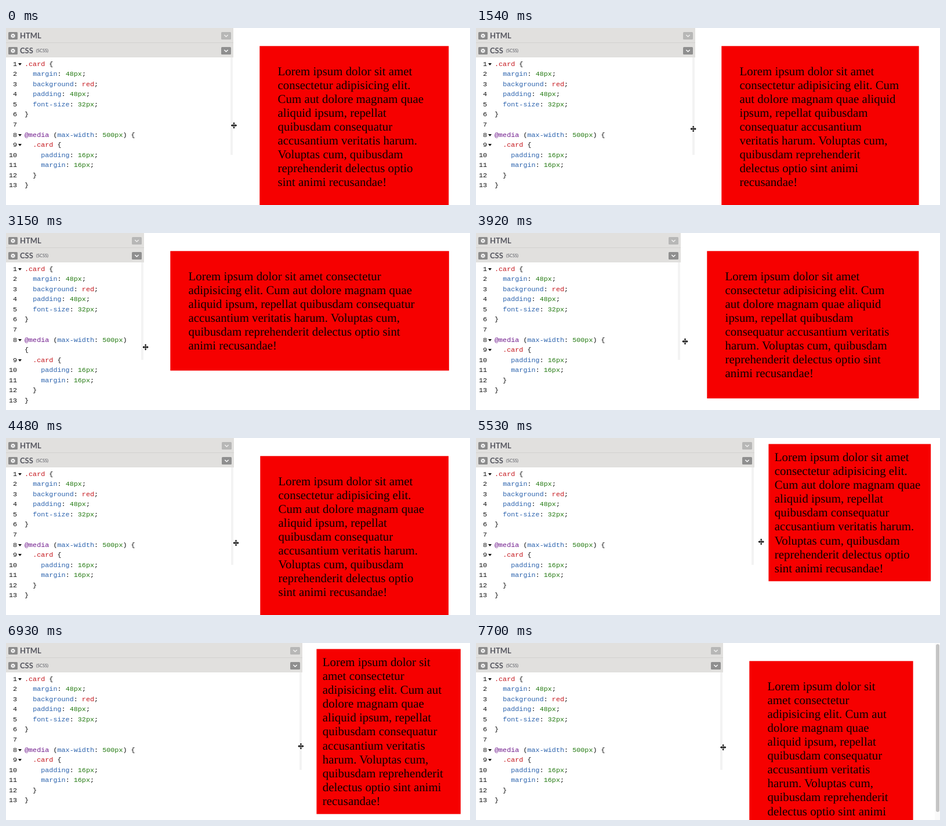
Animation of 800x307 px, one loop 7770 ms. Source, as an HTML page:

```html
<!DOCTYPE html>
<html lang="en">
<head>
<meta charset="utf-8">
<title>Resizing a card</title>
<style>
  html, body { margin: 0; width: 100%; height: 100%; overflow: hidden; background: #fff; }
  #stage { position: relative; width: 800px; height: 307px; overflow: hidden; background: #fff; }

  #editor { position: absolute; left: 0; top: 0; height: 307px; }
  .bar {
    position: absolute; left: 0; right: 0; height: 25px;
    background: #e1e0de; color: #55565f;
    font: bold 13px/25px Lato, sans-serif;
  }
  .bar b { position: absolute; left: 24px; top: 1px; }
  .bar small { position: absolute; left: 52px; top: 1px; font-size: 7.4px; font-weight: normal; }
  .bar svg { position: absolute; top: 6.5px; }
  .gear { left: 4px; }
  .fold { right: 4px; }
  .html { top: 0; border-bottom: 1px solid #d3d2d0; }
  .css { top: 26px; }
  .html .fold { opacity: .5; }

  #code { position: absolute; left: 0; right: 18px; top: 54.5px; font: 11.78px/17.58px "Liberation Mono", monospace; color: #111; }
  .line { position: relative; padding-left: 32px; min-height: 17.58px; white-space: pre-wrap; }
  .line i { position: absolute; left: 0; width: 19px; text-align: right; font-style: normal; }
  .open::before {
    content: ""; position: absolute; left: 20.5px; top: 6.3px;
    border: 3.6px solid transparent; border-top: 4.4px solid #111; border-bottom: 0;
  }
  .sel, .val { color: #c4161c; }
  .at { color: #6f1a8c; }
  .prop { color: #2a62ad; }
  .num { color: #247a12; }
  #thumb { position: absolute; right: 1px; top: 51px; width: 4px; height: 169px; background: #f3f3f3; }

  #page { position: absolute; top: 0; transform: scale(.652); transform-origin: 0 0; }
  #card {
    margin: 48px; padding: 48px; background: #f60000; color: #0c0000;
    font: 32px/37px "Liberation Serif", "Times New Roman", serif;
    text-rendering: geometricPrecision;
  }
  .narrow #card { margin: 16px; padding: 16px; }
  #scroll { position: absolute; left: 791px; top: 0; width: 9px; height: 307px; background: #fafafa; }
  #scroll::before {
    content: ""; position: absolute; left: 1.5px; top: 2px; width: 6px; height: 291px;
    border-radius: 3px; background: #c4c4c4;
  }
  #cursor { position: absolute; left: -8px; top: -8px; }
</style>
</head>
<body>
<div id="stage">
  <div id="page"><div id="card">Lorem ipsum dolor sit amet consectetur adipisicing elit. Cum aut dolore magnam quae aliquid ipsum, repellat quibusdam consequatur accusantium veritatis harum. Voluptas cum, quibusdam reprehenderit delectus optio sint animi recusandae!</div></div>
  <div id="scroll"></div>
  <div id="editor">
    <div class="bar html"><b>HTML</b></div>
    <div class="bar css"><b>CSS</b><small>(SCSS)</small></div>
    <div id="code"></div>
    <div id="thumb"></div>
  </div>
  <svg id="cursor" width="16" height="16">
    <path d="M8 2.5V13.5M3 8H13M5.5 5.5L3 8L5.5 10.5M10.5 5.5L13 8L10.5 10.5M6.5 4L8 2.7L9.5 4M6.5 12L8 13.3L9.5 12" fill="none" stroke="#fff" stroke-width="3"/>
    <path d="M8 3V13M3.5 8H12.5" stroke="#111" stroke-width="1.5"/>
    <path d="M2.8 8L5.8 5.4V10.6ZM13.2 8L10.2 5.4V10.6ZM8 2.4L9.8 4.6H6.2ZM8 13.6L9.8 11.4H6.2Z" fill="#111"/>
  </svg>
</div>
<script>
const $ = id => document.getElementById(id);
const LOOP = 7770, STEP = 70, SCALE = .652, RIGHT = 794.4;

const GEAR = `<svg class="gear" width="16" height="13"><rect width="16" height="13" rx="1.5" fill="#8b8b8b"/>
  <circle cx="8" cy="6.5" r="2.1" fill="none" stroke="#fff" stroke-width="1.7"/>
  <circle cx="8" cy="6.5" r="3.3" fill="none" stroke="#fff" stroke-width="1.2" stroke-dasharray="1.3 1.29"/></svg>`;
const FOLD = `<svg class="fold" width="17" height="13"><rect width="17" height="13" rx="1.5" fill="#8f8f8f"/>
  <path d="M5.3 5L8.5 8L11.7 5" fill="none" stroke="#fff" stroke-width="1.4"/></svg>`;
document.querySelectorAll('.bar').forEach(bar => bar.insertAdjacentHTML('beforeend', GEAR + FOLD));

const SOURCE = `.card {
  margin: 48px;
  background: red;
  padding: 48px;
  font-size: 32px;
}

@media (max-width: 500px) {
  .card {
    padding: 16px;
    margin: 16px;
  }
}`;
const RULES = [
  ['sel', /^\.card/], ['at', /^@media/], ['num', /^\d+px/],
  ['prop', /^[a-z-]+(?=:)/], ['val', /^red/]
];

function colour(text) {
  let out = '';
  while (text) {
    const rule = RULES.find(([, re]) => re.test(text));
    const part = rule ? text.match(rule[1])[0] : text[0];
    out += rule ? `<span class="${rule[0]}">${part}</span>` : part;
    text = text.slice(part.length);
  }
  return out;
}

$('code').innerHTML = SOURCE.split('\n').map((text, n) =>
  `<div class="line${text.endsWith('{') ? ' open' : ''}"><i>${n + 1}</i>${colour(text)}</div>`).join('');

// time (ms), editor width (px), speed (px/s)
const DRAG = [
  [0, 392, 0], [1250, 392, 0], [1540, 377.5, -60], [2100, 320, -140], [2600, 252, -90],
  [2950, 235, 0], [3150, 237.6, 10], [3900, 350, 130], [4480, 393, 50], [5050, 412, 80],
  [5530, 480, 190], [5850, 514, 0], [6700, 514, 0], [6930, 511, -33], [7300, 465, -130],
  [7700, 426, -15], [7900, 424, 0]
];
// time (ms), pointer height (px), speed (px/s)
const LIFT = [
  [0, 169, 0], [1250, 169, 0], [1540, 175, 15], [3150, 198, 0], [4480, 182, 0],
  [5530, 180, 0], [6930, 179, 0], [7700, 181, 0], [7900, 181, 0]
];

// cubic Hermite curve through the points
function follow(points, t) {
  const i = points.findIndex(p => p[0] > t);
  const [t0, a, va] = points[i - 1], [t1, b, vb] = points[i];
  const d = t1 - t0, u = (t - t0) / d, w = 1 - u, k = d / 1000;
  return a * (1 + 2 * u) * w * w + va * k * u * w * w
       + b * u * u * (3 - 2 * u) - vb * k * u * u * w;
}

function draw(t) {
  const width = follow(DRAG, t);
  const page = $('page'), left = width + 14, view = (RIGHT - left) / SCALE;
  $('editor').style.width = width + 'px';
  page.style.left = left + 'px';
  page.style.width = view + 'px';
  page.className = view <= 500 ? 'narrow' : '';

  const gap = view <= 500 ? 16 : 48;
  const tall = $('card').offsetHeight + 2 * gap > 540;
  if (tall) page.style.width = view - 15 + 'px';
  $('scroll').style.display = tall ? 'block' : 'none';

  // the pane trails the pointer slightly
  const x = follow(DRAG, t + 60) + 1, y = follow(LIFT, t);
  $('cursor').style.transform = `translate(${x}px, ${y}px)`;
}

const start = performance.now();
function tick() {
  const t = (performance.now() - start) % LOOP;
  draw(Math.floor(t / STEP) * STEP);
  requestAnimationFrame(tick);
}
tick();
</script>
</body>
</html>
```
